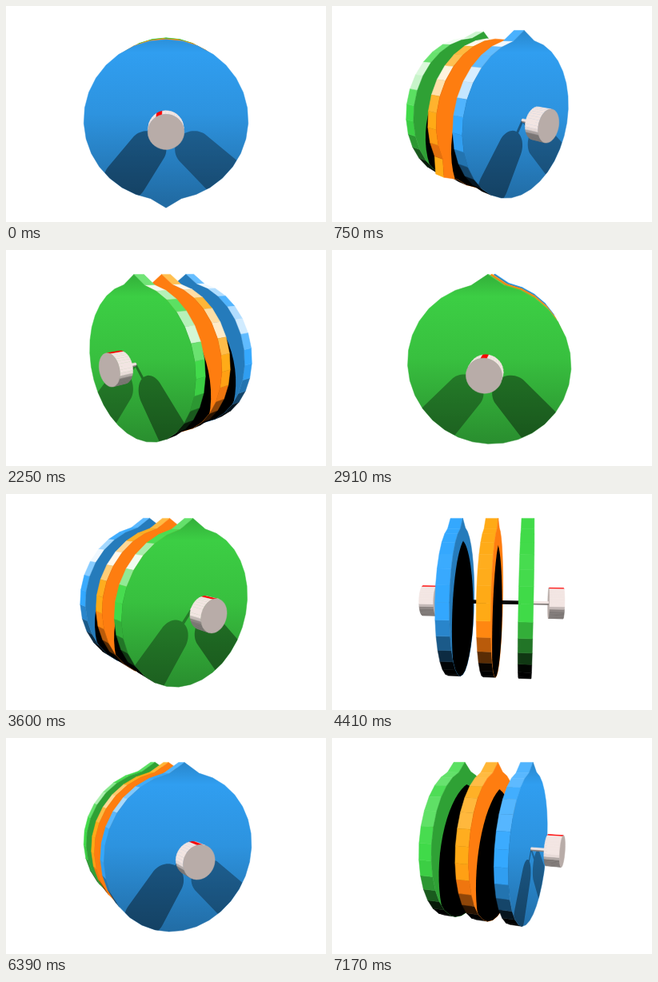
An HTML page with a canvas for the animation above (7200 ms loop, 400 px wide and 270 px high).

```html
<!DOCTYPE html>
<html lang="en">
<head>
<meta charset="utf-8">
<style>
html, body { margin: 0; width: 100%; height: 100%; overflow: hidden; background: #fff; }
canvas { display: block; }
</style>
</head>
<body>
<canvas id="stage" width="400" height="270"></canvas>
<script>
const ctx = document.getElementById('stage').getContext('2d');
const LOOP = 7200, STEP = 30, TAU = 2 * Math.PI, RAD = Math.PI / 180;
const DIST = 490, PITCH = 12.2 * RAD, SIN = Math.sin(PITCH), COS = Math.cos(PITCH);
const RADIUS = 92.4, BUMP = 9.9, SIDES = 32, HALF = 7.5, SPACING = 42.8;
const KNOB = 79, KNOB_HALF = 9, KNOB_RADIUS = 18.8, SHAFT_RADIUS = 2;
const BLUE = [48, 158, 240], ORANGE = [325, 160, 20], GREEN = [60, 206, 68];
const STEEL = [228, 216, 213], RED = [255, 0, 0];
// Lamps stand still beside the discs while the camera orbits.
const LAMPS = [[140, 200, 200], [-210, 200, 200], [175, 200, -200], [-175, 200, -200]];

let cosYaw = 1, sinYaw = 0, eye = DIST, view = [0, 0, 1];

const dot = (a, b) => a[0] * b[0] + a[1] * b[1] + a[2] * b[2];
const unit = v => v.map(n => n / Math.hypot(...v));
const tint = (color, k, white = 0) => 'rgb(' + color.map(c => {
  const base = Math.min(255, c * k);
  return Math.round(base + (255 - base) * white);
}).join() + ')';

// Local point (x, y, along the axle) to the stage.
function project(x, y, a) {
  const wx = x * cosYaw + a * sinYaw;
  const wz = a * cosYaw - x * sinYaw;
  const depth = DIST - wz * COS - y * SIN;
  const k = DIST / depth;
  return [200 + wx * k, 135 - (y * COS - wz * SIN) * k, depth];
}

function addPolygon(points) {
  points.forEach((p, i) => i ? ctx.lineTo(p[0], p[1]) : ctx.moveTo(p[0], p[1]));
  ctx.closePath();
}

function trace(...polygons) {
  ctx.beginPath();
  polygons.forEach(addPolygon);
}

function fill(points, paint) {
  trace(points);
  ctx.fillStyle = ctx.strokeStyle = paint;
  ctx.lineWidth = .5;
  ctx.fill();
  ctx.stroke();
}

function shade(color, normal, glossy) {
  let light = 0, glint = 0;
  for (const lamp of LAMPS) {
    const ray = unit(lamp);
    const half = unit(ray.map((n, i) => n + view[i]));
    light += Math.max(0, dot(normal, ray));
    glint += Math.max(0, dot(normal, half)) ** 40;
  }
  if (!glossy) return tint(color, Math.min(1.06, Math.max(.55, light)));
  const sheen = glint * 3.2 * Math.max(0, 1 - dot(normal, view)) * Math.min(1, light);
  return tint(color, Math.min(1.06, light), Math.min(.92, sheen));
}

function outline(sides, radius, turn, bump = 0, offset = 0) {
  return Array.from({ length: sides }, (_, i) => {
    const angle = (i + offset) * TAU / sides + turn * RAD;
    const r = radius + (i ? 0 : bump);
    return [r * Math.sin(angle), r * Math.cos(angle)];
  });
}

function drawRim(shape, a0, a1, color, { glossy = false, marks = 0 } = {}) {
  const faces = [];
  shape.forEach(([x0, y0], i) => {
    const [x1, y1] = shape[(i + 1) % shape.length];
    const q = [project(x0, y0, a1), project(x1, y1, a1), project(x1, y1, a0), project(x0, y0, a0)];
    const cross = (q[1][0] - q[0][0]) * (q[2][1] - q[0][1]) - (q[1][1] - q[0][1]) * (q[2][0] - q[0][0]);
    if (cross >= 0) return;
    const normal = unit([y0 - y1, x1 - x0, 0]);
    const paint = i < marks ? tint(RED, 1) : shade(color, normal, glossy);
    faces.push({ q, paint, depth: q.reduce((s, p) => s + p[2], 0) });
  });
  faces.sort((m, n) => n.depth - m.depth).forEach(f => fill(f.q, f.paint));
}

// Shadow on the plane at a of a cylinder standing from height h0 to h1 above it.
function shadow(lamp, a, side, radius, h0, h1) {
  const height = (lamp[2] - a) * side;
  const ends = [h0, h1].map(h => {
    const f = h / (height - h);
    return { x: -lamp[0] * f, y: -lamp[1] * f, r: radius * (1 + f) };
  });
  return Array.from({ length: 64 }, (_, i) => {
    const x = Math.sin(i * TAU / 64), y = Math.cos(i * TAU / 64);
    const reach = e => e.r + x * e.x + y * e.y;
    const e = reach(ends[1]) > reach(ends[0]) ? ends[1] : ends[0];
    return project(e.x + x * e.r, e.y + y * e.r, a);
  });
}

const lampsFacing = (a, side) => LAMPS.filter(l => (l[2] - a) * side > 0);

function drawOuterShadows(a, side) {
  const inner = KNOB - KNOB_HALF - Math.abs(a);
  lampsFacing(a, side).forEach((lamp, i) => {
    trace(shadow(lamp, a, side, KNOB_RADIUS, inner, inner + 2 * KNOB_HALF),
      shadow(lamp, a, side, SHAFT_RADIUS, 0, inner));
    ctx.fillStyle = i ? 'rgba(0,0,0,.33)' : 'rgba(0,0,0,.4)';
    ctx.fill();
  });
}

// Black only where the neighbouring disc hides every lamp.
function drawInnerShadow(a, side) {
  const gap = SPACING - 2 * HALF;
  for (const lamp of lampsFacing(a, side)) {
    trace(shadow(lamp, a, side, RADIUS, gap, SPACING));
    ctx.clip();
  }
  ctx.fillStyle = '#000';
  ctx.fillRect(0, 0, 400, 270);
}

function outerPaint(color) {
  const paint = ctx.createLinearGradient(0, 25, 0, 245);
  [[0, .82], [.15, 1], [.5, .93], [1, .68]].forEach(([at, k]) => paint.addColorStop(at, tint(color, k)));
  return paint;
}

function visibleSide(center, half) {
  return eye > center + half ? 1 : eye < center - half ? -1 : 0;
}

function drawCap(shape, a, paint) {
  const points = shape.map(([x, y]) => project(x, y, a));
  fill(points, paint);
  return points;
}

function drawDisc(center, color, turn) {
  const shape = outline(SIDES, RADIUS, turn, BUMP);
  drawRim(shape, center - HALF, center + HALF, color, { glossy: true });
  const side = visibleSide(center, HALF);
  if (!side) return;
  const a = center + side * HALF, outer = center * side > 0;
  const points = drawCap(shape, a, outer ? outerPaint(color) : tint(color, .78));
  ctx.save();
  trace(points);
  ctx.clip();
  (outer ? drawOuterShadows : drawInnerShadow)(a, side);
  ctx.restore();
}

function drawKnob(center, turn) {
  const shape = outline(36, KNOB_RADIUS, turn, 0, -1);
  drawRim(shape, center - KNOB_HALF, center + KNOB_HALF, STEEL, { marks: 2 });
  const side = visibleSide(center, KNOB_HALF);
  if (side) drawCap(shape, center + side * KNOB_HALF, 'rgb(184,172,168)');
}

function drawShaft(from, to, color) {
  drawRim(outline(8, SHAFT_RADIUS, 0), Math.min(from, to), Math.max(from, to), color);
}

function draw(t) {
  const yaw = t * .06 * RAD;
  cosYaw = Math.cos(yaw);
  sinYaw = Math.sin(yaw);
  eye = DIST * COS * cosYaw;
  view = [-sinYaw * COS, SIN, cosYaw * COS];
  const dial = -22 - 338 * Math.min(1, t / 1500);
  const blueTurn = Math.max(0, 180 - .36 * t);
  const orangeTurn = Math.min(0, (t - 1500) / 6);
  const greenTurn = Math.max(0, (800 - t) * .225);

  const parts = [
    [0, () => drawDisc(0, ORANGE, orangeTurn)],
    [SPACING, () => drawDisc(SPACING, BLUE, blueTurn)],
    [-SPACING, () => drawDisc(-SPACING, GREEN, greenTurn)]
  ];
  for (const side of [-1, 1]) {
    parts.push(
      [side * KNOB, () => drawKnob(side * KNOB, dial)],
      [side * 60, () => drawShaft(side * (SPACING + HALF), side * (KNOB - KNOB_HALF), STEEL)],
      [side * SPACING / 2, () => drawShaft(side * HALF, side * (SPACING - HALF), [0, 0, 0])]
    );
  }
  ctx.fillStyle = '#fff';
  ctx.fillRect(0, 0, 400, 270);
  ctx.lineJoin = 'round';
  parts.sort((m, n) => Math.abs(n[0] - eye) - Math.abs(m[0] - eye));
  parts.forEach(([, paint]) => paint());
}

const start = performance.now();
function tick() {
  const t = (performance.now() - start) % LOOP;
  draw(Math.floor(t / STEP) * STEP);
  requestAnimationFrame(tick);
}
tick();
</script>
</body>
</html>
```
